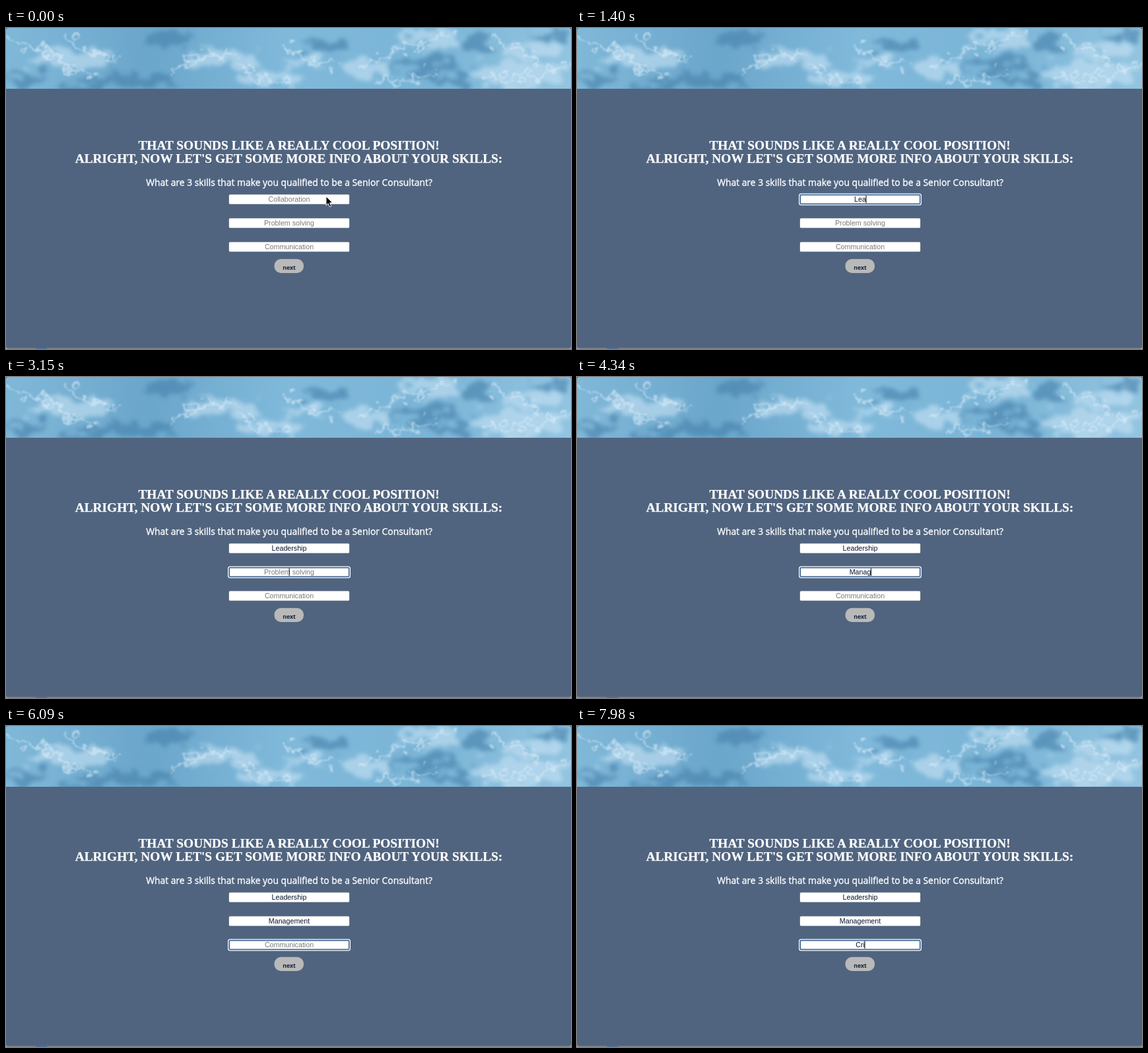
Animation of 856 by 486 pixels, one loop 8 s. Source, as an HTML page:

```html
<!DOCTYPE html>
<html lang="en">
<head>
<meta charset="utf-8">
<title>Skills form</title>
<style>
  html, body { margin: 0; width: 100%; height: 100%; overflow: hidden; background: #50647f; }
  svg { display: block; width: 100%; height: 100%; }
  text { text-anchor: middle; }
  .heading { font: bold 19.38px "Liberation Serif", Georgia, serif; fill: #fff; stroke: #fff; stroke-width: .25; }
  .question { font: 13.88px "Open Sans", "Trebuchet MS", sans-serif; fill: #fff; stroke: #fff; stroke-width: .35; }
  .value { font: 10.7px "Liberation Sans", Arial, sans-serif; fill: #0b1830; white-space: pre; }
  .value.hint { fill: #7a7a7a; }
  .button { font: bold 8.8px "Open Sans", "Trebuchet MS", sans-serif; fill: #14233c; }
</style>
</head>
<body>
<svg id="stage" viewBox="0 0 856 486" xmlns="http://www.w3.org/2000/svg">
  <defs>
    <clipPath id="banner"><rect width="856" height="92"/></clipPath>
    <linearGradient id="sea">
      <stop offset="0" stop-color="#80b8d8"/>
      <stop offset=".25" stop-color="#6ba6cb"/>
      <stop offset=".5" stop-color="#80b9da"/>
      <stop offset=".75" stop-color="#7ab4d6"/>
      <stop offset="1" stop-color="#92c4e0"/>
    </linearGradient>
    <filter id="swell" x="-20%" y="-50%" width="140%" height="200%">
      <feTurbulence type="fractalNoise" baseFrequency=".04 .06" numOctaves="5" seed="4"/>
      <feDisplacementMap in="SourceGraphic" scale="45" xChannelSelector="R" yChannelSelector="G"/>
      <feGaussianBlur stdDeviation="3"/>
    </filter>
    <filter id="foam" x="-20%" y="-50%" width="140%" height="200%">
      <feTurbulence type="fractalNoise" baseFrequency=".06 .08" numOctaves="5" seed="9"/>
      <feDisplacementMap in="SourceGraphic" scale="45" xChannelSelector="R" yChannelSelector="G"/>
      <feGaussianBlur stdDeviation="1.3"/>
    </filter>
  </defs>

  <rect width="856" height="486" fill="#50647f"/>

  <g clip-path="url(#banner)">
    <rect width="856" height="92" fill="url(#sea)"/>
    <g fill="#4a83ad" opacity=".65" filter="url(#swell)">
      <ellipse cx="190" cy="80" rx="66" ry="12"/>
      <ellipse cx="245" cy="16" rx="40" ry="11"/>
      <ellipse cx="35" cy="76" rx="38" ry="9"/>
      <ellipse cx="110" cy="88" rx="34" ry="6"/>
      <ellipse cx="485" cy="28" rx="36" ry="9"/>
      <ellipse cx="635" cy="56" rx="52" ry="11"/>
      <ellipse cx="675" cy="78" rx="34" ry="8"/>
      <ellipse cx="715" cy="26" rx="22" ry="20"/>
      <ellipse cx="825" cy="12" rx="30" ry="8"/>
    </g>
    <g fill="#c3e0f3" opacity=".65" filter="url(#swell)">
      <ellipse cx="75" cy="45" rx="42" ry="15"/>
      <ellipse cx="135" cy="45" rx="28" ry="13"/>
      <ellipse cx="330" cy="48" rx="58" ry="12"/>
      <ellipse cx="400" cy="76" rx="42" ry="10"/>
      <ellipse cx="450" cy="50" rx="30" ry="10"/>
      <ellipse cx="545" cy="62" rx="40" ry="14"/>
      <ellipse cx="640" cy="16" rx="50" ry="12"/>
      <ellipse cx="775" cy="70" rx="70" ry="20"/>
      <ellipse cx="800" cy="36" rx="45" ry="10"/>
    </g>
    <g fill="none" stroke="#dceefa" stroke-width="5" stroke-linecap="round" opacity=".6" filter="url(#foam)">
      <path d="M0 14Q45 24 72 45T130 72"/>
      <path d="M95 12Q120 40 165 48"/>
      <path d="M250 66Q285 40 340 40"/>
      <path d="M350 55L385 80L425 82"/>
      <path d="M425 28Q445 52 500 55"/>
      <path d="M540 58Q600 30 680 8"/>
      <path d="M555 80Q610 82 650 66"/>
      <path d="M725 72Q780 85 850 54"/>
      <path d="M735 20Q775 24 805 48"/>
    </g>
  </g>

  <text class="heading" x="428.5" y="184">THAT SOUNDS LIKE A REALLY COOL POSITION!</text>
  <text class="heading" x="428.5" y="204">ALRIGHT, NOW LET'S GET SOME MORE INFO ABOUT YOUR SKILLS:</text>
  <text class="question" x="429" y="238.6">What are 3 skills that make you qualified to be a Senior Consultant?</text>

  <g id="fields"></g>

  <rect x="406.5" y="349.7" width="44.5" height="21.3" rx="10" fill="#b9b9b9"/>
  <text class="button" x="429" y="365.5">next</text>

  <rect y="484.4" width="856" height="1.6" fill="#858485"/>
  <rect x="45" y="484.4" width="17" height="1.6" fill="#4d6c98"/>
  <path d="M0 481V486H4Q0 485 0 481ZM856 481V486H852Q856 485 856 481Z" fill="#9a9da3"/>
  <path d="M0 0H3Q0 0 0 3ZM856 0H853Q856 0 856 3Z" fill="#35506b"/>

  <path id="pointer" transform="translate(484.5 254.5)" d="M.5 .5V14L3.6 11.2L5.8 16.3L8.3 15.2L6.1 10.3H10.3Z"
        fill="#000" stroke="#fff" stroke-width="1"/>
</svg>
<script>
  const LOOP = 8000, CENTER = 429, BLINK = 500;
  const fields = [
    { y: 252, hint: "Collaboration", word: "Leadership", focus: 560, blur: 2870,
      keys: [980, 1190, 1330, 1540, 1680, 1820, 2030, 2170, 2310, 2450] },
    { y: 288, hint: "Problem solving", word: "Management", focus: 2870, blur: 5250,
      keys: [3640, 3780, 3990, 4130, 4270, 4480, 4620, 4760, 4900, 5040] },
    { y: 324, hint: "Communication", word: "Cri", focus: 5250, blur: LOOP,
      keys: [7560, 7700, 7840] }
  ];

  function add(parent, tag, attrs) {
    const node = document.createElementNS("http://www.w3.org/2000/svg", tag);
    for (const name in attrs) node.setAttribute(name, attrs[name]);
    return parent.appendChild(node);
  }

  const show = (node, on) => node.setAttribute("visibility", on ? "visible" : "hidden");

  const root = document.getElementById("fields");
  const pointer = document.getElementById("pointer");

  for (const field of fields) {
    const { y } = field;
    add(root, "rect", { x: 337.5, y: y - .2, width: 183, height: 15.2, rx: 2, fill: "#858c96" });
    add(root, "rect", { x: 338, y: y + .2, width: 182, height: 14.3, rx: 1.5, fill: "#fff" });
    field.ring = add(root, "g", {});
    add(field.ring, "rect", { x: 336, y: y - 1.5, width: 186, height: 18, rx: 3.5, fill: "#fff" });
    add(field.ring, "rect", { x: 338.2, y: y + .6, width: 181.6, height: 13.8, rx: 1.5,
      fill: "#fff", stroke: "#3f6796", "stroke-width": 1.8 });
    field.text = add(root, "text", { x: CENTER, y: y + 11.4 });
    field.caret = add(root, "rect", { y: y + 1.5, width: 1, height: 11.5, fill: "#000" });
  }

  function drawField(field, time) {
    const typed = field.keys.filter(key => key <= time);
    const focused = time >= field.focus && time < field.blur;
    const label = typed.length ? field.word.slice(0, typed.length) : field.hint;
    const lastInput = typed.length ? typed[typed.length - 1] : field.focus;

    if (field.text.textContent !== label) field.text.textContent = label;
    field.text.setAttribute("class", typed.length ? "value" : "value hint");
    const end = typed.length ? field.text.getComputedTextLength() / 2 : 0;
    field.caret.setAttribute("x", CENTER + end - .4);
    show(field.ring, focused);
    show(field.caret, focused && Math.floor((time - lastInput) / BLINK) % 2 === 0);
  }

  function render(now) {
    const time = now % LOOP;
    for (const field of fields) drawField(field, time);
    show(pointer, time < fields[0].keys[0]);
  }

  function tick() {
    render(performance.now());
    requestAnimationFrame(tick);
  }
  tick();
</script>
</body>
</html>
```
